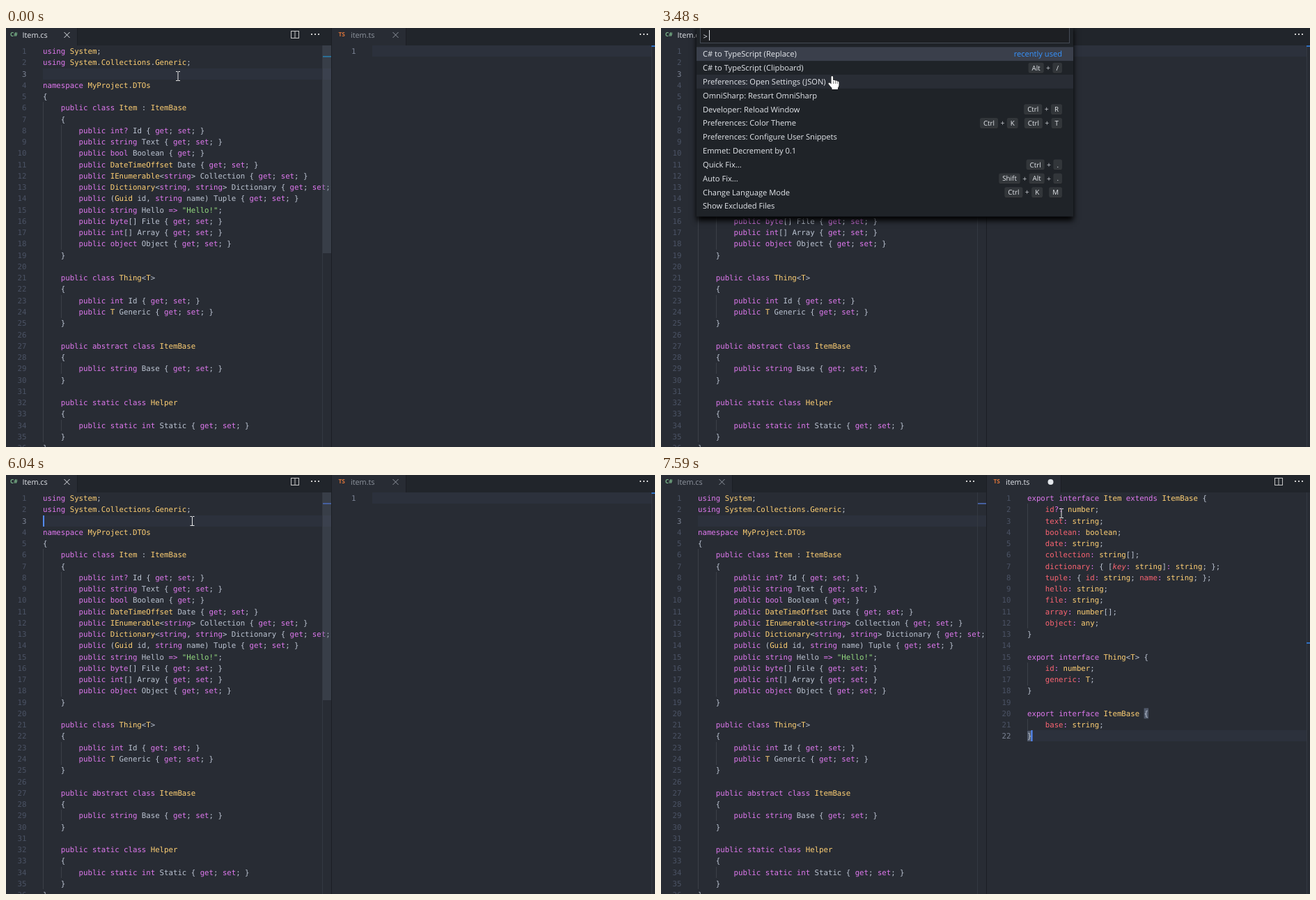
An HTML page with a canvas that plays this animation: 932x601 px, repeating every 7.99 s.

```html
<!DOCTYPE html>
<html lang="en">
<head>
<meta charset="utf-8">
<title>C# to TypeScript</title>
<style>
html, body { margin: 0; width: 100%; height: 100%; overflow: hidden; background: #282c34; }
canvas { display: block; width: 932px; height: 601px; }
</style>
</head>
<body>
<canvas id="stage" width="932" height="601"></canvas>
<script>
const ctx = document.getElementById('stage').getContext('2d');
ctx.textRendering = 'geometricPrecision';
const LOOP = 7990;
const CHAR = 6.447, LINE = 16.26, TOP = 25;
const MONO = '10.71px "DejaVu Sans Mono", monospace';
const SANS = '"Open Sans", "Noto Sans", sans-serif';
const UI = 11.13;
const C = {
  bg: '#282c34', bar: '#21252b', edge: '#1b1e24', line: '#2c313c', guide: '#3b4048',
  text: '#bcc4d2', key: '#df78ee', type: '#ffd074', str: '#93d97f', prop: '#fb6472',
  num: '#4b5365', numOn: '#7b8394', caret: '#528bff', bright: '#e4e7ec', dim: '#8f959f'
};

const csharp = `using System;
using System.Collections.Generic;

namespace MyProject.DTOs
{
    public class Item : ItemBase
    {
        public int? Id { get; set; }
        public string Text { get; set; }
        public bool Boolean { get; }
        public DateTimeOffset Date { get; set; }
        public IEnumerable<string> Collection { get; set; }
        public Dictionary<string, string> Dictionary { get; set; }
        public (Guid id, string name) Tuple { get; set; }
        public string Hello => "Hello!";
        public byte[] File { get; set; }
        public int[] Array { get; set; }
        public object Object { get; set; }
    }

    public class Thing<T>
    {
        public int Id { get; set; }
        public T Generic { get; set; }
    }

    public abstract class ItemBase
    {
        public string Base { get; set; }
    }

    public static class Helper
    {
        public static int Static { get; set; }
    }
}`.split('\n');

const typescript = `export interface Item extends ItemBase {
    id?: number;
    text: string;
    boolean: boolean;
    date: string;
    collection: string[];
    dictionary: { [key: string]: string; };
    tuple: { id: string; name: string; };
    hello: string;
    file: string;
    array: number[];
    object: any;
}

export interface Thing<T> {
    id: number;
    generic: T;
}

export interface ItemBase {
    base: string;
}`.split('\n');

const csKeys = /^(using|namespace|public|class|int|string|bool|byte|object|abstract|static|get|set|=>|\?)$/;
const tsKeys = /^(export|interface|extends|:|\?:)$/;

function csColor(word, rest) {
  if (csKeys.test(word)) return C.key;
  if (word[0] === '"') return C.str;
  return /^[A-Z]/.test(word) && !/^ (\{|=>)/.test(rest) ? C.type : C.text;
}
function tsColor(word, rest) {
  if (tsKeys.test(word)) return C.key;
  if (!/^\w/.test(word)) return C.text;
  return /^\??:/.test(rest) ? C.prop : C.type;
}

function rect(x, y, w, h, color) {
  ctx.fillStyle = color;
  ctx.fillRect(x, y, w, h);
}
function label(text, x, y, size, color, weight = 400) {
  ctx.font = `${weight} ${size}px ${SANS}`;
  ctx.fillStyle = color;
  ctx.fillText(text, x, y);
}
const lineTop = n => TOP + (n - 1) * LINE;
const baseline = n => Math.round(lineTop(n) + 12);

function code(lines, x, color) {
  lines.forEach((line, i) => {
    for (const m of line.matchAll(/"[^"]*"|\w+|\?:|=>|[^\w\s]/g)) {
      const word = m[0];
      ctx.font = (word === 'key' ? 'italic ' : '') + MONO;
      ctx.fillStyle = color(word, line.slice(m.index + word.length));
      ctx.fillText(word, x + m.index * CHAR, baseline(i + 1));
    }
  });
}
function numbers(count, right, active) {
  ctx.font = MONO;
  ctx.textAlign = 'right';
  for (let n = 1; n <= count; n++) {
    ctx.fillStyle = n === active ? C.numOn : C.num;
    ctx.fillText(n, right, baseline(n));
  }
  ctx.textAlign = 'left';
}
function guide(x, from, to) {
  rect(x, Math.round(lineTop(from)), 1, Math.round((to - from + 1) * LINE), C.guide);
}

function tab(x, width, icon, iconColor, title, on, dirty) {
  rect(x, 0, width, 25, C.bg);
  rect(x + width, 0, 1, 25, C.edge);
  const close = x + width - 14.5;
  label(icon, x ? 477.5 : 6, 12, 8.3, iconColor, 700);
  label(title, x ? 495 : 23.5, 14, 10.8, on ? C.bright : C.dim);
  if (dirty) {
    ctx.fillStyle = C.bright;
    ctx.beginPath();
    ctx.arc(close, 10, 4, 0, 7);
    ctx.fill();
    return;
  }
  ctx.strokeStyle = on ? C.bright : C.dim;
  ctx.lineWidth = 1;
  ctx.beginPath();
  ctx.moveTo(close - 4, 6); ctx.lineTo(close + 4, 14);
  ctx.moveTo(close + 4, 6); ctx.lineTo(close - 4, 14);
  ctx.stroke();
}
function splitIcon(x) {
  ctx.strokeStyle = '#c5c5c5';
  ctx.lineWidth = 1;
  ctx.strokeRect(x + .5, 4.5, 11, 10);
  rect(x + 5.5, 4, 1, 11, '#c5c5c5');
}
function dots(x) {
  for (let i = 0; i < 3; i++) rect(x + i * 5, 8, 2, 2, '#d0d0d0');
}

function beam(x, y) {
  rect(x - .5, y - 6, 1, 13, '#e8e8e8');
  for (const dy of [-7, 6]) {
    rect(x - 3, y + dy, 2.5, 1, '#e8e8e8');
    rect(x + .5, y + dy, 2.5, 1, '#e8e8e8');
  }
}
function hand(x, y) {
  ctx.save();
  ctx.translate(x, y);
  const shape = new Path2D('M-2 9V1.2Q-2 0 -.8 0T.6 1.2V6Q3 5 4 6.8Q6 6 7 7.6Q9 7 9 9.2V13Q9 15 7.4 17V19H-1V17Q-3 15 -6 11.2Q-6.6 9.6 -5 9.4Q-3.5 9.4 -2 11.5Z');
  ctx.fillStyle = '#fff';
  ctx.strokeStyle = '#111';
  ctx.lineWidth = 1;
  ctx.stroke(shape);
  ctx.fill(shape);
  for (const dx of [.6, 3.4, 6.2]) rect(dx, 7, .8, 4, '#555');
  ctx.restore();
}

const commands = [
  ['C# to TypeScript (Replace)', ''],
  ['C# to TypeScript (Clipboard)', 'Alt+/'],
  ['Preferences: Open Settings (JSON)', ''],
  ['OmniSharp: Restart OmniSharp', ''],
  ['Developer: Reload Window', 'Ctrl+R'],
  ['Preferences: Color Theme', 'Ctrl+K Ctrl+T'],
  ['Preferences: Configure User Snippets', ''],
  ['Emmet: Decrement by 0.1', ''],
  ['Quick Fix...', 'Ctrl+.'],
  ['Auto Fix...', 'Shift+Alt+.'],
  ['Change Language Mode', 'Ctrl+K M'],
  ['Show Excluded Files', '']
];

// Key caps are laid out from the right edge.
function keycaps(keys, y) {
  let x = 576;
  for (const part of keys.split(/([+ ])/).reverse()) {
    if (part === ' ') { x -= 9; continue; }
    if (part === '+') {
      label('+', x - 9.3, y + 3.6, 10.5, '#c8ccd2');
      x -= 12.7;
      continue;
    }
    ctx.font = `400 9.8px ${SANS}`;
    const w = ctx.measureText(part).width + 10;
    x -= w;
    ctx.fillStyle = 'rgba(128,128,128,.2)';
    ctx.beginPath();
    ctx.roundRect(x, y - 7.5, w, 14.5, 2.5);
    ctx.fill();
    rect(x + 1, y + 6.2, w - 2, .8, 'rgba(68,68,68,.6)');
    label(part, x + 5, y + 3.4, 9.8, C.bright);
  }
}

function palette(selected, caret, slider) {
  ctx.save();
  ctx.shadowColor = '#000';
  ctx.shadowBlur = 8;
  ctx.shadowOffsetY = 5;
  rect(51, -4, 541, 274.5, '#1f2328');
  ctx.restore();
  rect(56, 0, 531, 22, '#454b55');
  rect(57, 0, 529, 21, '#1d1f23');
  label('>', 60.5, 15.5, UI, C.bright);
  if (caret) rect(69, 3, 1, 15, C.bright);
  const row = 19.85;
  rect(51, 27.3 + selected * row, 541, row, '#3a3f4b');
  rect(51, 27.3 + 2 * row, 541, row, '#292d35');
  if (slider) rect(583, 27, 9, 18, '#343a45');
  commands.forEach(([name, keys], i) => {
    const y = 37.3 + i * row;
    label(name, 60, Math.round(y + 3.8), UI, C.bright);
    if (keys) keycaps(keys, y);
  });
  ctx.textAlign = 'right';
  label('recently used', 576, 41, UI, '#3794ff');
  ctx.textAlign = 'left';
}

const between = (t, a, b) => t >= a && t < b;

function draw(t) {
  const open = between(t, 2540, 4570);
  const rightOn = t >= 6510;
  const pasted = t >= 7520;
  const leftCaret = between(t, 450, 1000) || between(t, 1460, 1920) ||
    between(t, 4640, 5120) || between(t, 5580, 6110);
  const rightCaret = between(t, 6510, 6900) || t >= 7440;
  const slider = between(t, 3020, 4570) || t >= 6980 ? 0 : t >= 6900 ? .5 : 1;

  rect(0, 0, 932, 601, C.bg);
  rect(0, 0, 932, 25, C.bar);

  // left pane
  ctx.save();
  ctx.beginPath();
  ctx.rect(0, 0, 467, 601);
  ctx.clip();
  tab(0, 102, 'C#', '#7ab58a', 'Item.cs', !rightOn);
  if (!rightOn) splitIcon(409);
  dots(438);
  rect(53, 58, 414, 16, C.line);
  guide(53, 6, 35);
  for (const [a, b] of [[8, 18], [23, 24], [29, 29], [34, 34]]) guide(79, a, b);
  numbers(36, 29.5, 3);
  code(csharp, 53, csColor);
  rect(454, 25, 1, 576, '#343942');
  ctx.globalAlpha = slider;
  rect(455, 25, 12, 298, 'rgba(94,102,120,.3)');
  ctx.globalAlpha = 1;
  rect(455, 40, 12, 2, t < 4570 ? '#2b6f96' : '#46609f');
  if (leftCaret) rect(53, 58, 2, 16, C.caret);
  ctx.restore();
  rect(467, 0, 1, 601, C.edge);

  // right pane
  tab(468, 106, 'TS', '#d9733a', 'item.ts', rightOn, pasted);
  if (rightOn) splitIcon(881);
  dots(910);
  const last = pasted ? 22 : 1;
  rect(526, Math.round(lineTop(last)), 401, 16, C.line);
  if (pasted) {
    for (const [a, b] of [[2, 12], [16, 17], [21, 21]]) guide(526, a, b);
    rect(526 + 26 * CHAR, lineTop(20) + .5, CHAR, 15, '#515a6b');
    rect(526, lineTop(22) + .5, CHAR, 15, '#515a6b');
    code(typescript, 526, tsColor);
  }
  numbers(last, 502.5, last);
  rect(927, 25, 1, 576, '#343942');
  rect(927, pasted ? 240 : 25, 5, 2, '#2f6fc0');
  if (rightCaret) rect(pasted ? 531.5 : 526, Math.round(lineTop(last)), 2, 16, C.caret);

  if (open) {
    const caret = between(t, 2540, 3020) || between(t, 3480, 3940) || t >= 4510;
    palette(t < 3710 ? 0 : 1, caret, t >= 3710);
    hand(246.5, 69);
  } else if (t < 6040) {
    beam(247, 69);
  } else {
    const p = Math.min(1, Math.floor((t - 6040) / 78) / 5);
    const e = p * p * (3 - 2 * p);
    beam(267.5 + 307.5 * e, 66 - 11 * e);
  }
}

const start = performance.now();
function tick() {
  draw((performance.now() - start) % LOOP);
  requestAnimationFrame(tick);
}
tick();
</script>
</body>
</html>
```
